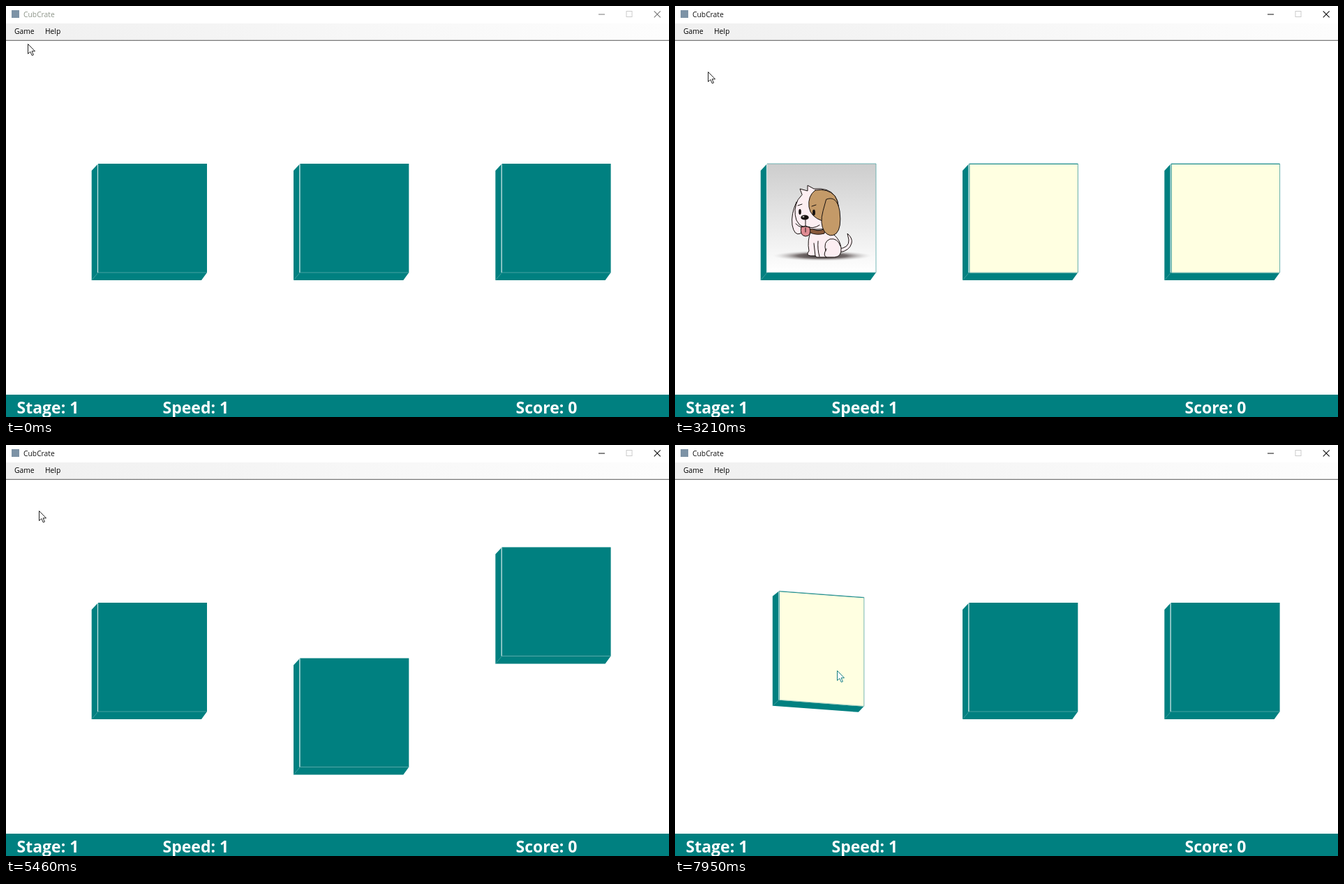
Animation, 950 px wide and 589 px high, one loop 8 s. Source, as an HTML page:

```html
<!DOCTYPE html>
<html lang="en">
<head>
<meta charset="utf-8">
<title>Card shuffle</title>
<style>
  html, body { margin: 0; width: 100%; height: 100%; overflow: hidden; background: #fff; }
  svg { display: block; width: 100vw; height: 100vh; }
  text { font: 10.3px "Open Sans", "Noto Sans", sans-serif; }
  .status text { font-size: 23px; font-weight: 700; fill: #fff; }
  .ink { stroke: #17110f; stroke-width: 1; stroke-linejoin: round; stroke-linecap: round; }
</style>
</head>
<body>
<svg id="stage" viewBox="0 0 950 589">
  <defs>
    <linearGradient id="bar"><stop stop-color="#f0f0f0"/><stop offset="1" stop-color="#fdfdfd"/></linearGradient>
    <linearGradient id="gutter"><stop stop-color="#fcfcfc"/><stop offset="1" stop-color="#f0f0f0"/></linearGradient>
    <linearGradient id="backdrop" x2="0" y2="1"><stop stop-color="#cdcdcd"/><stop offset="1" stop-color="#fff"/></linearGradient>
    <radialGradient id="shade"><stop stop-color="#332d2d"/><stop offset=".5" stop-color="#776f6f"/><stop offset="1" stop-color="#ddd" stop-opacity="0"/></radialGradient>

    <g id="puppy" transform="translate(-210 -304)">
      <rect x="132" y="226" width="156" height="156" fill="url(#backdrop)"/>
      <ellipse cx="211" cy="358" rx="71" ry="7.5" fill="url(#shade)"/>
      <g class="ink" fill="#fceef2">
        <path d="M234 348Q250 347 249 335L247 326Q255 333 253 340Q250 351 236 353Z"/>
        <path d="M195 322Q189 336 192 351Q187 357 194 358H201L203 360H229Q239 359 238 347Q237 336 228 328L214 322Z"/>
        <path d="M205 337Q204 349 207 359M216 351Q212 338 222 334Q233 332 237 344M217 348Q211 358 217 360M199 340L201 358" fill="none"/>
        <path d="M194 318Q205 325 215 319L214 326Q203 329 194 325Z" fill="#8a5a3c"/>
        <path d="M174 281Q166 298 168 314Q171 330 180 326Q185 321 181 306Z"/>
        <path d="M182 270L179 262L190 265L190 257L199 262Q220 260 229 272Q238 284 232 307Q225 321 204 320Q180 321 174 307Q169 292 176 278Z"/>
        <path d="M201 264Q219 261 229 272Q238 286 232 307L211 308Q194 302 192 288Q190 272 201 264Z" fill="#c49a68"/>
        <path d="M217 277Q232 271 236 294Q239 318 231 326Q222 333 214 323Q207 312 212 294Z" fill="#c49a68"/>
        <path d="M181 316Q178 329 187 330Q196 330 193 317Z" fill="#df8b92"/>
        <path d="M187 306V315M173 312Q181 320 187 315Q197 321 207 314M187 318V324M176 286L182 284M196 287L202 285" fill="none"/>
      </g>
      <g fill="#17110f">
        <ellipse cx="179" cy="295" rx="1.8" ry="4"/>
        <ellipse cx="199" cy="296" rx="2" ry="4.3"/>
        <ellipse cx="186" cy="303" rx="5.7" ry="3.6"/>
      </g>
      <ellipse cx="184" cy="302" rx="1.5" ry=".8" fill="#fff"/>
    </g>
  </defs>

  <rect width="950" height="589" fill="#fff"/>
  <rect x="8" y="6" width="11" height="11" fill="#7d93a6"/>
  <g id="titleBar">
    <text x="25" y="16">CubCrate</text>
    <path d="M849 12H858M928.7 7.3L937.7 16.3M937.7 7.3L928.7 16.3" stroke="currentColor" stroke-width="1.1"/>
  </g>
  <rect x="889" y="7.5" width="8" height="8" fill="none" stroke="#ccc"/>
  <rect y="25" width="950" height="24" fill="url(#bar)"/>
  <path d="M0 49.3H950" stroke="#585858"/>

  <g id="cards"></g>

  <g class="status">
    <rect y="557" width="950" height="32" fill="#008080"/>
    <text x="15.5" y="584">Stage: 1</text>
    <text x="224.5" y="584">Speed: 1</text>
    <text x="730.5" y="584">Score: 0</text>
  </g>

  <rect id="gameButton" x="4.5" y="27.5" width="43" height="18"/>
  <g id="menu">
    <rect x="7" y="47" width="103" height="65" fill="#000" opacity=".3"/>
    <path d="M4.5 44.5H107.5V110H4.5Z" fill="#fdfdfd" stroke="#858585"/>
    <rect x="6" y="46" width="24" height="63" fill="url(#gutter)"/>
    <path d="M5 44.5H47" stroke="#fdfdfd" stroke-width="2"/>
    <path d="M33 87.5H106" stroke="#bdbdbd"/>
    <rect id="highlight" x="6.5" y="46.5" width="99" height="18" fill="#b3d7f3" stroke="#2683c9"/>
    <text x="36" y="59">New</text><text x="69" y="59">F2</text>
    <text x="36" y="78">Score</text>
    <text x="36" y="102.5">Exit</text>
  </g>
  <text x="12" y="39.5">Game</text>
  <text x="56" y="39.5">Help</text>
  <path id="cursor" d="M0 0V14L3.3 11L5.8 16.4L7.9 15.5L5.6 10.3H10Z" fill="#fff" stroke-width="1"/>
</svg>

<script>
const LOOP = 8000, PITCH = 289.3, LIFT = 132, HALF = 78;
const $ = id => document.getElementById(id);
const show = (node, on) => node.setAttribute('display', on ? 'inline' : 'none');
const between = (t, from, to) => t >= from && t < to;

// Linear interpolation through [time, ...values] keys.
function track(t, keys) {
  const next = keys.findIndex(key => key[0] > t);
  if (next === 0) return keys[0].slice(1);
  if (next < 0) return keys[keys.length - 1].slice(1);
  const a = keys[next - 1], b = keys[next], k = (t - a[0]) / (b[0] - a[0]);
  return a.slice(1).map((v, i) => v + (b[i + 1] - v) * k);
}

const cursorKeys = [
  [60, 31, 54], [140, 30, 42], [340, 30, 42], [610, 29, 53], [880, 29, 53], [940, 29, 42],
  [1440, 29, 42], [1540, 29, 53], [1810, 29, 53], [2200, 36, 58], [2680, 36, 58], [2880, 47, 94],
  [5880, 47, 94], [6230, 50, 96], [6710, 50, 96], [7450, 232, 323]
];
const previewKeys = [[2050, 0], [2600, 180], [3250, 180], [3600, 0]];
const pickKeys = [[7480, 0], [7750, 180], [7850, 180], [7950, 141.7], [8050, 104]];

// Each swap sends its left card over the top and its right card underneath.
const swaps = [
  { left: 1, right: 2, slot: 1, start: 4162, speed: 0.365 },
  { left: 0, right: 2, slot: 0, start: 5677, speed: 0.394 }
];

function cardPosition(card, t) {
  let x = card * PITCH, y = 0;
  for (const swap of swaps) {
    if (t < swap.start || (card !== swap.left && card !== swap.right)) continue;
    const dist = Math.min((t - swap.start) * swap.speed, 2 * LIFT + PITCH);
    const across = Math.max(0, Math.min(dist - LIFT, PITCH));
    const rise = Math.min(dist, LIFT, 2 * LIFT + PITCH - dist);
    const goesRight = card === swap.left;
    x = swap.slot * PITCH + (goesRight ? across : PITCH - across);
    y = goesRight ? -rise : rise;
  }
  return [210 + x, 304 + y];
}

$('cards').innerHTML = [0, 1, 2].map(i => `<g>
  <path class="sides" fill="#008080"/>
  <path class="seam" fill="none" stroke="#64adad" stroke-width=".6"/>
  <g class="face">
    <rect x="-78" y="-78" width="156" height="156" fill="#008080"/>
    <g class="back">${i === 0 ? '<use href="#puppy"/>' : '<rect x="-77" y="-77" width="155" height="155.5" fill="#ffffe1"/>'}
      <path d="M-78 -78H78V78" fill="none" stroke="#55a6a6" stroke-width=".8"/></g>
    <path d="M-78.5 -78V78" stroke="#cfe6e6" stroke-width="1.2"/>
    <path d="M-78 78H78" stroke="#64adad" stroke-width=".7"/>
  </g></g>`).join('');

const cards = [...$('cards').children].map(node => ({
  sides: node.querySelector('.sides'), seam: node.querySelector('.seam'),
  face: node.querySelector('.face'), back: node.querySelector('.back')
}));

function drawCard(card, [cx, cy], degrees) {
  const angle = degrees * Math.PI / 180, c = Math.cos(angle), s = Math.sin(angle);
  const w = HALF * Math.abs(c), tilt = (c < 0 ? 7.25 : -7.25) * s;
  const y = cy + Math.sin(2 * angle) * (c > 0 ? 4 : 12.5);
  const left = cx - w, right = cx + w, dx = -9.3, dy = 11 - 4 * s;
  const top = y - HALF - tilt, low = y + HALF - tilt, lowRight = y + HALF + tilt;
  card.face.setAttribute('transform', `matrix(${Math.abs(c)} ${tilt / HALF} 0 1 ${cx} ${y})`);
  card.sides.setAttribute('d', `M${left} ${top}L${left + dx} ${top + dy - 1}V${low + dy}` +
    `L${right - 8} ${lowRight + dy}L${right} ${lowRight}L${left} ${low}Z`);
  card.seam.setAttribute('d', `M${left} ${low}l${dx} ${dy}`);
  show(card.back, c < 0);
}

function draw(t) {
  const active = t >= 400;
  $('titleBar').style.color = active ? '#111' : '#777';
  $('titleBar').style.fill = active ? '#111' : '#8c9488';

  const open = between(t, 1140, 1810);
  const hover = between(t, 130, 470) || between(t, 930, 1140);
  show($('gameButton'), open || hover);
  $('gameButton').setAttribute('fill', open ? '#fdfdfd' : '#b3d7f3');
  $('gameButton').setAttribute('stroke', open ? '#858585' : '#2683c9');
  show($('menu'), open);
  show($('highlight'), t >= 1470);

  const stepTime = Math.floor((t + 10) / 70) * 70;
  cards.forEach((card, i) => {
    const [angle] = track(t, i === 2 && t > 7000 ? pickKeys : previewKeys);
    drawCard(card, cardPosition(i, stepTime), angle);
  });

  const [x, y] = track(t, cursorKeys);
  $('cursor').setAttribute('transform', `translate(${x + 0.5} ${y + 0.5})`);
  $('cursor').setAttribute('stroke', t < 5880 ? '#222' : '#177f80');
}

const begin = performance.now();
function tick() {
  draw((performance.now() - begin) % LOOP);
  requestAnimationFrame(tick);
}
tick();
</script>
</body>
</html>
```
